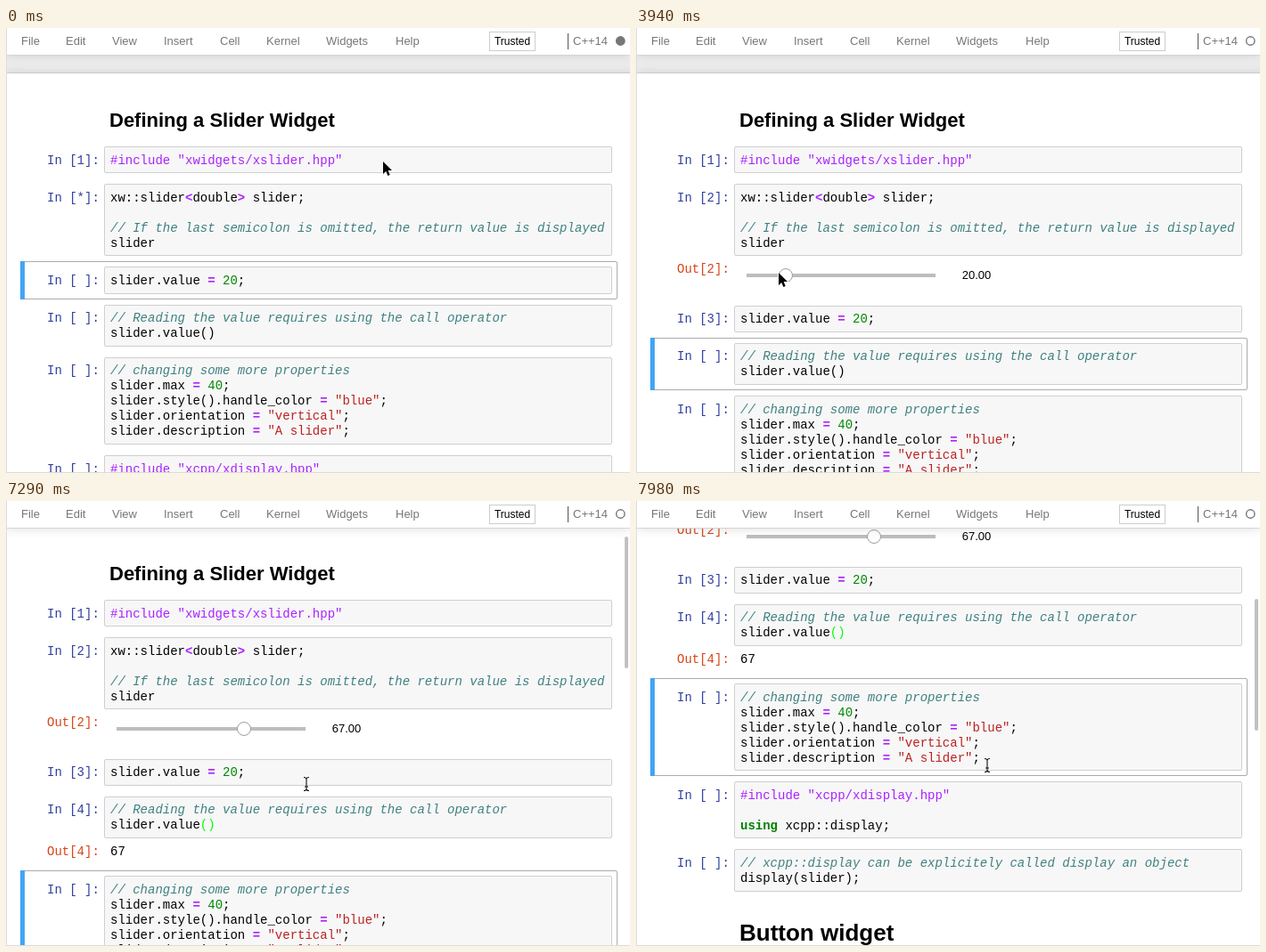
An HTML page for the animation above (8000 ms loop, 700x500 px).

```html
<!DOCTYPE html>
<html lang="en">
<head>
<meta charset="utf-8">
<title>Slider widget notebook</title>
<style>
  html, body { margin: 0; width: 100%; height: 100%; overflow: hidden; }
  #stage {
    position: relative; width: 700px; height: 500px; overflow: hidden;
    background: #eee; color: #000;
    font: 13px/17px "Liberation Sans", Arial, sans-serif;
  }
  #stage::after {
    content: ""; position: absolute; inset: 0; z-index: 3;
    border: solid #dcdcdc; border-width: 0 0 1px 1px;
  }
  #header {
    position: absolute; z-index: 2; left: 0; top: 0; width: 700px; height: 30px;
    background: #fff; color: #777;
    box-shadow: 0 0 12px 1px rgba(87, 87, 87, .2), 0 1px 0 #e4e4e4;
  }
  #header span { position: absolute; top: 6px; white-space: pre; }
  #header .trusted {
    left: 542px; top: 4px; width: 50px; height: 20px; border: 1px solid #ccc;
    font-size: 12px; line-height: 21px; text-align: center; color: #000;
  }
  #header i { position: absolute; left: 630px; top: 6px; width: 1px; height: 18px; background: #555; }
  #header svg { position: absolute; left: 0; top: 0; }

  #page { position: absolute; left: 0; top: 0; width: 700px; height: 1000px; }
  #paper {
    position: absolute; left: 1px; top: 51px; width: 720px; height: 1200px;
    background: #fff; box-shadow: 0 0 12px 1px rgba(87, 87, 87, .2), 0 -1px 0 #d8d8d8;
  }
  h1, h2 { margin: 0; font-weight: bold; white-space: pre; }
  h1 { position: relative; margin: 27px 0 0 116px; font-size: 26px; line-height: 26px; }
  h2 { position: absolute; left: 116px; top: 93px; font-size: 22px; line-height: 22px; }
  #cells { position: absolute; left: 0; top: 127px; }
  .cell {
    position: relative; box-sizing: border-box; margin-left: 16px; width: 670px;
    padding: 5px 5px 5px 93px; border: 1px solid transparent; border-radius: 2px;
  }
  .cell.on { border-color: #ababab; }
  .cell.on::before {
    content: ""; position: absolute; left: -1px; top: -1px; bottom: -1px;
    width: 5px; background: #42a5f5;
  }
  .cell.edit { border-color: #66bb6a; }
  .cell.edit::before { background: #66bb6a; }
  pre, .prompt { margin: 0; font: 14px/17px "Liberation Mono", "Courier New", monospace; white-space: pre; }
  pre.code {
    position: relative; padding: 6.6px 6px 4.6px; border: 1px solid #cfcfcf;
    border-radius: 2px; background: #f7f7f7;
  }
  .prompt { position: absolute; left: 29px; top: 12.6px; color: #303f9f; }
  .out { position: relative; }
  .out .prompt { left: -64px; top: 7px; color: #d84315; }
  .out pre { position: absolute; left: 7px; top: 7px; }
  .meta { color: #a2f; }
  .op { color: #a2f; font-weight: bold; }
  .num { color: #080; }
  .str { color: #ba2121; }
  .key { color: #008000; font-weight: bold; }
  .note { color: #408080; font-style: italic; }
  .match .pair { color: #0f0; }
  #caret { position: absolute; left: 123.6px; top: 24px; width: 1px; height: 16px; background: #000; }
  #track { position: absolute; left: 14px; top: 19.6px; width: 212px; height: 4px; background: #bdbdbd; }
  #knob {
    position: absolute; top: 13.6px; box-sizing: border-box; width: 16px; height: 16px;
    border: 1px solid #9e9e9e; border-radius: 50%; background: #fff;
  }
  #knob.drag { background: #2196f3; border-color: #2196f3; }
  #value { position: absolute; left: 242px; top: 12.6px; width: 60px; text-align: center; }
  #bar {
    position: absolute; left: 694px; top: 33px; width: 4px; height: 148px;
    border-radius: 2px; background: #c1c1c1;
  }
  #pointer { position: absolute; z-index: 4; left: 0; top: 0; overflow: visible; }
</style>
</head>
<body>
<div id="stage">
  <div id="page">
    <div id="paper"></div>
    <h2>Defining a Slider Widget</h2>
    <div id="cells"></div>
  </div>
  <div id="bar"></div>
  <div id="header">
    <span class="trusted">Trusted</span><i></i>
    <span style="left:636px">C++14</span>
    <svg width="700" height="30">
      <circle id="busy" cx="689.3" cy="14.5" r="4.7" stroke="#777" stroke-width="1.4"/>
      <path id="pencil" d="M607 20v-3l8-8 3 3-8 8z" fill="#777"/>
    </svg>
  </div>
  <svg id="pointer" width="1" height="1">
    <path id="arrow" d="M0 0V14L3.3 11 5.4 16 7.7 15 5.6 10.1H10Z" stroke="#fff" stroke-width="1.6" paint-order="stroke"/>
    <path id="beam" d="M-3-7.5Q0-7.5 0-5.5Q0-7.5 3-7.5M0-5.5V5.5M-3 7.5Q0 7.5 0 5.5Q0 7.5 3 7.5M-2 3H2" fill="none" stroke="#111" stroke-width="1.1"/>
  </svg>
</div>
<script>
const LOOP = 8000;
const $ = id => document.getElementById(id);

const menu = { File: 17, Edit: 67, View: 119, Insert: 177, Cell: 240, Kernel: 292, Widgets: 359, Help: 437 };
for (const [name, x] of Object.entries(menu))
  $('header').insertAdjacentHTML('beforeend', `<span style="left:${x}px">${name}</span>`);

const sources = [
  '#include "xwidgets/xslider.hpp"',
  'xw::slider<double> slider;\n\n// If the last semicolon is omitted, the return value is displayed\nslider',
  'slider.value = 20;',
  '// Reading the value requires using the call operator\nslider.value()',
  '// changing some more properties\nslider.max = 40;\nslider.style().handle_color = "blue";\nslider.orientation = "vertical";\nslider.description = "A slider";',
  '#include "xcpp/xdisplay.hpp"\n\nusing xcpp::display;',
  '// xcpp::display can be explicitely called display an object\ndisplay(slider);'
];

const kinds = ['note', 'meta', 'str', 'key', 'num', 'op'];
const tokens = /(\/\/.*)|(#include.*)|("[^"]*")|(\busing\b)|(\b\d+\b)|([=<>])/g;
const escape = s => s.replace(/</g, '&lt;').replace(/>/g, '&gt;');

function paint(code) {
  let html = '', end = 0;
  for (const m of code.matchAll(tokens)) {
    const kind = kinds[m.slice(1).findIndex(Boolean)];
    html += escape(code.slice(end, m.index)) + `<span class="${kind}">${escape(m[0])}</span>`;
    end = m.index + m[0].length;
  }
  return html + escape(code.slice(end));
}

const output = (n, height, body) =>
  `<div class="out" style="height:${height}px"><div class="prompt">Out[${n}]:</div>${body}</div>`;

$('cells').innerHTML = sources.map((code, i) => {
  let html = paint(code), out = '';
  if (i === 1) out = output(2, 43.2, '<div id="track"></div><div id="knob"></div><div id="value"></div>');
  if (i === 3) {
    html = html.replace('()', '<span class="pair">()</span>') + '<div id="caret"></div>';
    out = output(4, 30, '<pre>67</pre>');
  }
  return `<div class="cell"><div class="prompt"></div><pre class="code">${html}</pre>${out}</div>`;
}).join('') + '<h1>Button widget</h1>';

const cells = [...document.querySelectorAll('.cell')];
const inputs = cells.map(c => c.querySelector('.code'));
const prompts = cells.map(c => c.querySelector('.prompt'));
const outs = [1, 3].map(i => cells[i].querySelector('.out'));

const show = (el, on) => { el.style.display = on ? '' : 'none'; };
const ease = p => (1 - Math.cos(Math.PI * p)) / 2;

// Progress in n equal hard steps, the first at a and the last at b.
function steps(t, a, b, n) {
  if (t < a) return 0;
  return Math.min(n, Math.floor((t - a) / (b - a) * (n - 1) + 1e-6) + 1) / n;
}

// Pointer legs: start, end, steps, target x, target y.
const legs = [
  [3430, 3825, 8, 131, 270],
  [3880, 3940, 2, 160, 275],
  [4180, 4181, 1, 163, 277],
  [4474, 4990, 9, 262, 278],
  [5110, 5160, 2, 262, 322],
  [5220, 5560, 6, 261, 388],
  [6700, 6930, 5, 337, 318],
  [7930, 7980, 2, 394, 297]
];

function pointerAt(t) {
  let x = 423, y = 150;
  for (const [a, b, n, toX, toY] of legs) {
    const p = ease(steps(t, a, b, n));
    x += (toX - x) * p;
    y += (toY - y) * p;
  }
  return [x, y];
}

const scrolls = [22, 40, 64, 93, 121, 147, 170, 189, 204, 217, 227, 234, 238];
function scrollAt(t) {
  if (t < 6220) return 0;
  if (t < 7290) return 18;
  return scrolls[Math.round(steps(t, 7290, 7980, 13) * 13) - 1];
}

const count = (t, start, done, n) => t < start ? ' ' : t < done ? '*' : n;

function draw(t) {
  const editing = t >= 5630 && t < 6160;
  const selected = t < 2900 ? 2 : t < 6160 ? 3 : 4;
  const marks = [1, count(t, 0, 1140, 2), count(t, 2900, 3080, 3), count(t, 6160, 6400, 4)];
  cells.forEach((cell, i) => {
    cell.classList.toggle('on', i === selected);
    cell.classList.toggle('edit', i === selected && editing);
    prompts[i].textContent = `In [${marks[i] ?? ' '}]:`;
  });
  cells[3].classList.toggle('match', t >= 5630);
  show($('caret'), editing);
  show($('pencil'), editing);
  show(outs[0], t >= 1140);
  show(outs[1], t >= 6400);
  $('busy').setAttribute('fill', marks.includes('*') ? '#777' : 'none');

  const value = t < 3080 ? 0 : Math.round(20 + 47 * ease(steps(t, 4474, 4990, 9)));
  $('value').textContent = value.toFixed(2);
  $('knob').style.left = 8 + 2.1 * value + 'px';
  $('knob').classList.toggle('drag', t >= 4410 && t < 5110);

  const scroll = scrollAt(t);
  $('page').style.top = -scroll + 'px';
  $('bar').style.top = 33.3 + 0.322 * scroll + 'px';
  $('bar').style.opacity = t < 6220 ? 0 : t < 7290 ? 1 - steps(t, 6700, 6930, 5) : 1;

  const [x, y] = pointerAt(t);
  const overText = t >= 3430 && x > 110 && x < 680 && inputs.some(el => {
    const box = el.getBoundingClientRect();
    return y > box.top && y < box.bottom;
  });
  show($('beam'), overText);
  show($('arrow'), !overText);
  $('pointer').style.transform = `translate(${x}px, ${y}px)`;
}

function tick() {
  draw(performance.now() % LOOP);
  requestAnimationFrame(tick);
}
tick();
</script>
</body>
</html>
```
